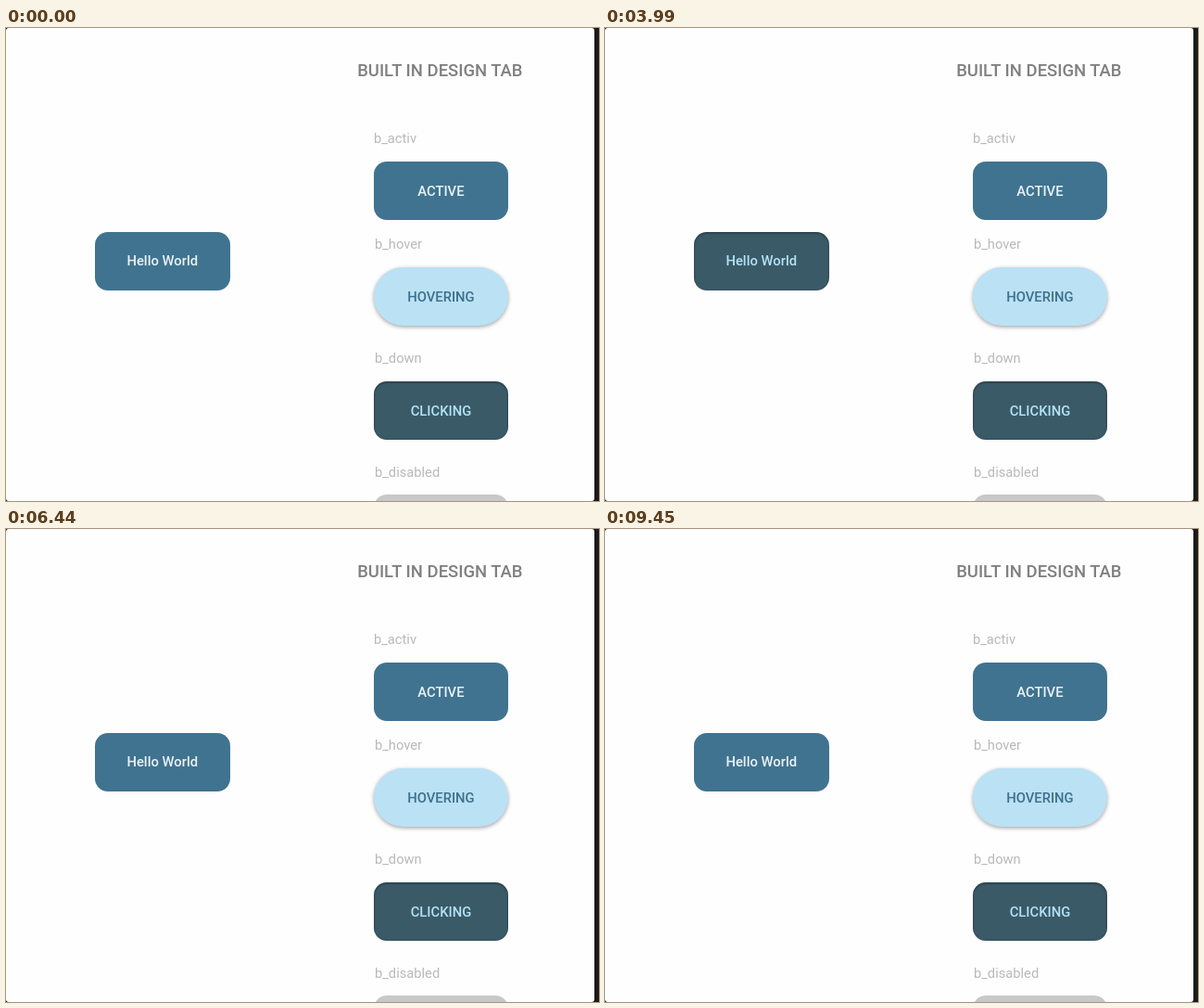
Recreate the animation shown at these times as an HTML page. Size 640 px wide and 510 px high, loop 9.52 s.

```html
<!DOCTYPE html>
<html lang="en">
<head>
<meta charset="utf-8">
<title>Button states</title>
<style>
/* weights of the hover and pressed looks; both 0 = active */
@property --h { syntax: "<number>"; inherits: false; initial-value: 0; }
@property --d { syntax: "<number>"; inherits: false; initial-value: 0; }

html, body { margin: 0; width: 100%; height: 100%; overflow: hidden; background: #1b1b1b; }
body { position: relative; font: 14.7px Roboto, sans-serif; }
.page {
  position: absolute; left: 0; top: 0; width: 635px; height: 510px;
  overflow: hidden; border-radius: 3px; background: #fefefe;
}
.page > * { position: absolute; white-space: nowrap; }
h1 {
  left: 318.3px; width: 300px; top: 33.6px; margin: 0;
  font-size: 18.5px; font-weight: 500; line-height: 24px;
  text-align: center; color: #808080;
}
.label { left: 397px; line-height: 20px; color: #b9b9b9; }
.label ~ .label { left: 398px; }
.btn {
  --mid: calc(var(--h) * (1 - var(--h))); /* bows the active-hover blend */
  left: 396.7px; width: 145.5px; height: 63px; line-height: 64px;
  text-align: center; font-size: 14.8px; font-weight: 500;
  border-radius: calc(14px + 17.5px * var(--h));
  background: hsl(
    calc(201 - 18 * var(--mid) - 2 * var(--d))
    calc(38% + 36% * var(--h) + 25% * var(--mid) - 10.4% * var(--d) - 70% * var(--h) * var(--d))
    calc(40.6% + 44.1% * var(--h) - 8.6% * var(--d)));
  color: hsl(calc(200 - 3 * var(--d))
    calc(45% - 6% * var(--h) - 20% * var(--mid) + 33% * var(--d))
    calc(94% - 55% * var(--h) - 12% * var(--mid) - 11% * var(--d)));
  box-shadow:
    0 1.5px 4px rgb(0 0 0 / calc(.36 * var(--h) * var(--h))),
    inset 0 1px 3px rgb(0 0 0 / calc(.42 * var(--d)));
}
.hover { --h: 1; line-height: 65px; }
.down { --d: 1; }
.off { background: #c8c8c8; }
.live { left: 96px; top: 219.8px; line-height: 63px; animation: use 9520ms ease infinite; }

@keyframes use {
  0%, 12.08% { --h: 0; --d: 0; }
  22.584% { --h: 1; --d: 0; }
  23.004% { --h: 1; --d: 0; animation-timing-function: cubic-bezier(.4, .2, .7, .7); }
  25.63% { --h: .64; --d: 0; }
  29.937%, 31.933% { --h: 1; --d: 0; }
  42.437%, 42.962% { --h: 0; --d: 1; }
  53.466%, 56.618% { --h: 1; --d: 0; }
  67.122% { --h: 0; --d: 0; }
  68.908% { --h: 0; --d: 0; animation-timing-function: cubic-bezier(.3, .1, .4, .95); }
  77.206% { --h: 1; --d: 0; }
  86.45% { --h: 0; --d: 1; animation-timing-function: cubic-bezier(.4, .2, .7, .7); }
  88.971% { --h: .41; --d: .59; }
  99.265%, 100% { --h: 0; --d: 0; }
}
</style>
</head>
<body>
<div class="page">
  <h1>BUILT IN DESIGN TAB</h1>
  <div class="btn live">Hello World</div>

  <div class="label" style="top:109px">b_activ</div>
  <div class="btn" style="top:144px">ACTIVE</div>

  <div class="label" style="top:223px">b_hover</div>
  <div class="btn hover" style="top:258px">HOVERING</div>

  <div class="label" style="top:346px">b_down</div>
  <div class="btn down" style="top:380.5px">CLICKING</div>

  <div class="label" style="top:469px">b_disabled</div>
  <div class="btn off" style="top:503.3px"></div>
</div>
</body>
</html>
```
